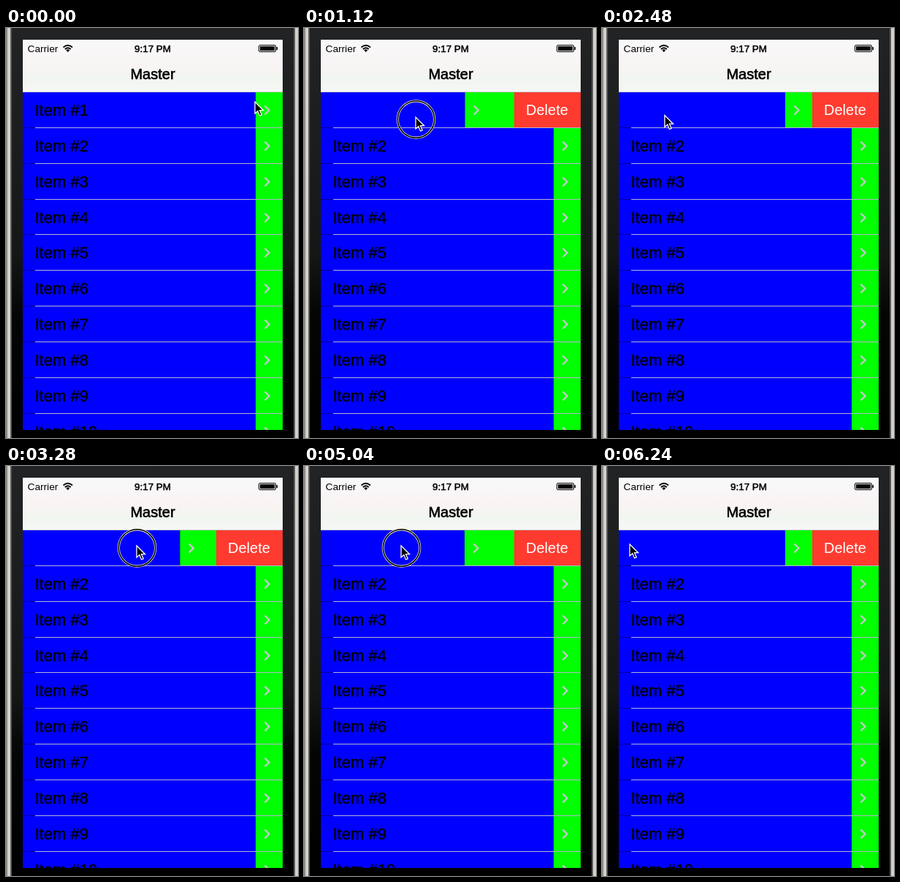
Recreate the animation shown at these times as an HTML page. Size 400x561 px, loop 6280 ms.

```html
<!DOCTYPE html>
<html lang="en">
<head>
<meta charset="utf-8">
<title>Swipe to delete</title>
<style>
  html, body { margin: 0; width: 100%; height: 100%; overflow: hidden; background: #000; }
  svg { display: block; width: 400px; height: 561px; }
  text { font-family: "Liberation Sans", Arial, sans-serif; }
  .item { font-size: 22px; stroke: #000; stroke-width: .4; }
  .chevron { fill: none; stroke: #c7c7cc; stroke-width: 2.4; }
</style>
</head>
<body>
<svg viewBox="0 0 400 561">
  <defs>
    <linearGradient id="bezel" x2="0" y2="1">
      <stop offset="0" stop-color="#222324"/>
      <stop offset=".55" stop-color="#151616"/>
      <stop offset=".7" stop-color="#050505"/>
      <stop offset="1" stop-color="#000"/>
    </linearGradient>
    <linearGradient id="bar" x2="0" y2="1">
      <stop offset="0" stop-color="#f9f9fa"/>
      <stop offset=".5" stop-color="#f9f4f4"/>
      <stop offset=".78" stop-color="#f1f6f0"/>
      <stop offset="1" stop-color="#f7f7f8"/>
    </linearGradient>
    <clipPath id="screen"><rect x="23" y="16" width="356" height="534"/></clipPath>
  </defs>

  <rect width="400" height="561" fill="url(#bezel)"/>
  <rect width="2" height="561" fill="#8f8d88"/>
  <rect x="2" width="4" height="561" fill="#d3d0ca"/>
  <rect x="6" width="2" height="561" fill="#555"/>
  <rect x="394" width="2" height="561" fill="#555"/>
  <rect x="396" width="4" height="561" fill="#d3d0ca"/>

  <g clip-path="url(#screen)">
    <rect x="288" y="88" width="91" height="48" fill="#ff3b30"/>
    <text x="304" y="119" font-size="20" fill="#fff">Delete</text>
    <g id="list"></g>
    <g id="lines"></g>

    <rect x="23" y="16" width="356" height="72" fill="url(#bar)"/>
    <rect x="23" y="87" width="356" height="1" fill="#c9c9ce"/>
    <text x="29.5" y="33" font-size="13.7">Carrier</text>
    <g fill="none" stroke="#000" stroke-width="1.8">
      <path d="M78.5 26.5Q84.7 21 91 26.5M80.8 29Q84.7 25.6 88.7 29"/>
      <path d="M82.2 30.2Q84.7 28.2 87.2 30.2L84.7 33Z" fill="#000" stroke="none"/>
    </g>
    <text x="201" y="33" font-size="13.4" text-anchor="middle" stroke="#000" stroke-width=".5">9:17 PM</text>
    <rect x="346.5" y="23.5" width="23" height="9" rx="1.5" fill="none" stroke="#000"/>
    <rect x="348" y="25" width="20" height="6"/>
    <rect x="370.5" y="26" width="1.5" height="4"/>
    <text x="201" y="70" font-size="20" text-anchor="middle" stroke="#000" stroke-width=".6">Master</text>
  </g>

  <g id="pointer">
    <g id="press" fill="none">
      <circle cx=".5" cy="3" r="25.2" stroke="#ecebcf" stroke-width="3.2"/>
      <circle cx=".5" cy="3" r="25.2" stroke="#000" stroke-width="1.6"/>
    </g>
    <path d="M0 0V16L3.8 12.6L6.5 19L9.2 17.9L6.5 11.7H11.6Z" stroke="#fff" stroke-width="1.3"/>
  </g>
</svg>
<script>
const LOOP = 6280, STEP = 40;
const LEFT = 23, RIGHT = 379, ACCESSORY = 342, DELETE_X = 288;
const WIDTH = RIGHT - LEFT, OPEN = RIGHT - DELETE_X;
const SPRING = 54;

// Pointer track: time, x, y
const track = [
  [0, 341, 101], [400, 315, 107], [640, 305, 113], [1120, 153, 122],
  [1800, 40, 131], [1920, 24, 131], [2060, 20, 130], [2500, 90, 119],
  [2900, 203, 109], [3080, 203, 109], [3280, 179, 109], [3700, 4, 119],
  [3960, 2, 120], [4100, 2, 120], [4700, 195, 111], [4860, 195, 111],
  [5040, 133, 109], [5640, 42, 107], [5720, 38, 107], [LOOP, 38, 107]
];

const drags = [
  { down: 640, up: 1980, grab: 305, base: 0 },
  { down: 3060, up: 3740, grab: 203, base: OPEN },
  { down: 4840, up: 5690, grab: 195, base: OPEN }
];

const $ = id => document.getElementById(id);

function add(parent, tag, attrs, text = "") {
  const el = document.createElementNS("http://www.w3.org/2000/svg", tag);
  for (const key in attrs) el.setAttribute(key, attrs[key]);
  el.textContent = text;
  parent.append(el);
  return el;
}

const lineY = i => Math.floor(136.3 + 48.88 * i);

function addRow(i) {
  const top = i ? lineY(i - 1) : 88;
  const height = lineY(i) - top;
  const mid = i ? top + 25 : 112;
  const row = add($("list"), "g", {});
  const green = add(row, "rect", { x: ACCESSORY, y: top, width: RIGHT - ACCESSORY, height, fill: "#0f0" });
  add(row, "rect", { x: LEFT, y: top, width: ACCESSORY - LEFT, height, fill: "#00f" });
  add(row, "text", { x: 39.5, y: mid + 8, class: "item" }, `Item #${i + 1}`);
  add(row, "path", { d: `M354.5 ${mid - 5.5}l6 6l-6 6`, class: "chevron" });
  add($("lines"), "rect", { x: LEFT, y: lineY(i), width: 17, height: 1, fill: "#0000a0" });
  add($("lines"), "rect", { x: 40, y: lineY(i), width: RIGHT - 40, height: 1, fill: "#b4b4cf" });
  return { row, green };
}

const rows = Array.from({ length: 10 }, (_, i) => addRow(i));
const first = rows[0];

// Monotone cubic through one column of the track
function pointerAt(t, col) {
  const slope = i => {
    const a = track[i], b = track[i + 1];
    return a && b ? (b[col] - a[col]) / (b[0] - a[0]) : 0;
  };
  const tangent = i => {
    const a = slope(i - 1), b = slope(i);
    return a * b > 0 ? 2 * a * b / (a + b) : 0;
  };
  const i = Math.max(0, track.findIndex(k => k[0] > t) - 1);
  const a = track[i], b = track[i + 1];
  const span = b[0] - a[0], u = (t - a[0]) / span, v = 1 - u;
  return a[col] * v * v * (1 + 2 * u) + b[col] * u * u * (1 + 2 * v)
    + span * (tangent(i) * u * v * v - tangent(i + 1) * u * u * v);
}

const rubberBand = d => WIDTH * (1 - 1 / (1 + 0.55 * d / WIDTH));

function dragOffset(drag, t) {
  const d = Math.max(0, drag.base + drag.grab - pointerAt(t, 1));
  return d > OPEN ? OPEN + rubberBand(d - OPEN) : d;
}

function rowOffset(t) {
  const drag = drags.filter(d => d.down <= t).pop();
  if (!drag) return 0;
  if (t < drag.up) return dragOffset(drag, t);
  const s = (t - drag.up) / SPRING;
  return OPEN + (dragOffset(drag, drag.up) - OPEN) * (1 + s) * Math.exp(-s);
}

function draw(t) {
  const d = rowOffset(t);
  const end = Math.max(RIGHT - d, DELETE_X);
  first.row.setAttribute("transform", `translate(${-d})`);
  first.green.setAttribute("width", end - ACCESSORY + d);
  $("pointer").setAttribute("transform", `translate(${pointerAt(t, 1)} ${pointerAt(t, 2)})`);
  const pressed = drags.some(g => t >= g.down && t < g.up);
  $("press").setAttribute("visibility", pressed ? "visible" : "hidden");
}

const start = performance.now();
function frame() {
  const t = (performance.now() - start) % LOOP;
  draw(Math.floor(t / STEP) * STEP);
  requestAnimationFrame(frame);
}
frame();
</script>
</body>
</html>
```
